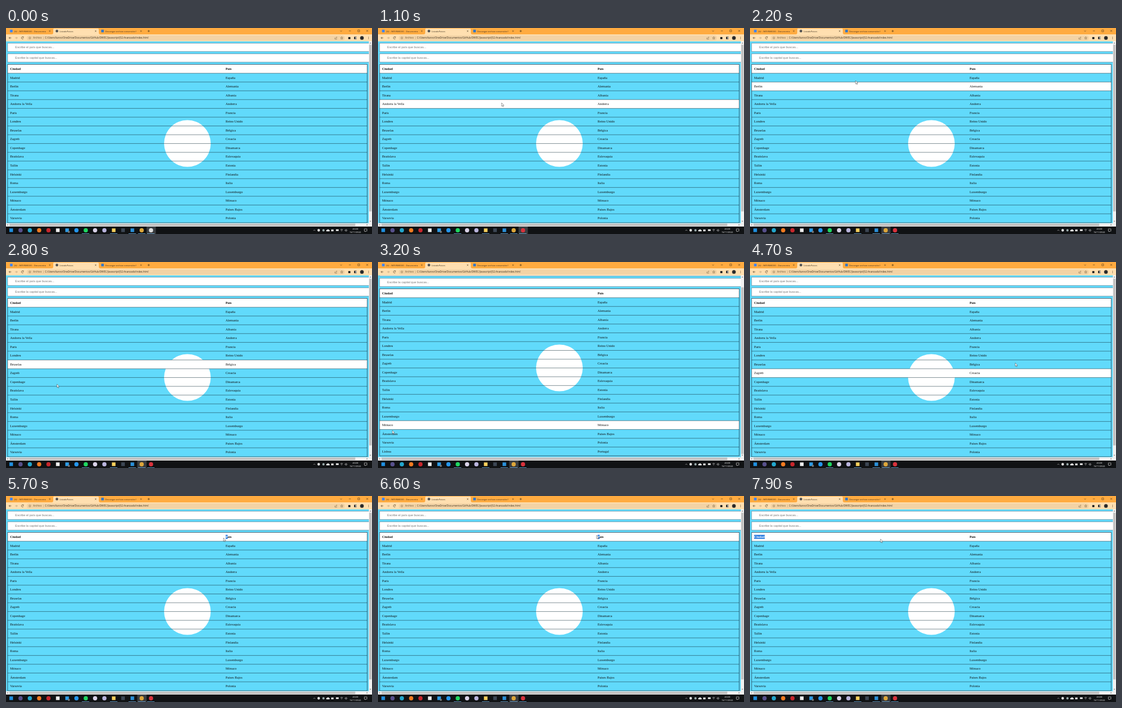
Write an HTML page that moves like this. It is 690 px wide and 388 px high and loops after 8000 ms.

```html
<!DOCTYPE html>
<html lang="es">
<head>
<meta charset="utf-8">
<title>ListadoPaises</title>
<style>
  html, body { margin: 0; width: 100%; height: 100%; overflow: hidden; background: #61dafb; }
  svg { display: block; width: 690px; height: 388px; }
  text { white-space: pre; }
  .ui { font-family: "Open Sans", "Noto Sans", sans-serif; fill: #3c3020; }
  .field { font: 5.75px "Liberation Sans", Arial, sans-serif; fill: #757575; }
  .cell { font: 6.3px "Liberation Serif", "Times New Roman", serif; fill: #111; }
  .head { font-weight: bold; }
</style>
</head>
<body>
<svg id="stage" viewBox="0 0 690 388" xmlns="http://www.w3.org/2000/svg">
  <defs><clipPath id="view"><rect y="25" width="684" height="342.6"/></clipPath></defs>
  <g clip-path="url(#view)"><g id="page"></g></g>
  <g id="chrome"></g>
  <g id="taskbar"></g>
  <path id="pointer" d="M0 0V6.4L1.5 5.1L2.5 7.3L3.5 6.9L2.5 4.7H4.5Z" fill="#fff" stroke="#333" stroke-width=".5"/>
</svg>
<script>
const LOOP = 8000, STEP = 100;
const TOP = 85.2, PITCH = 16.55, LEFT = 3, RIGHT = 681, COL = 414;

const countries = [
  ['Madrid', 'España'], ['Berlín', 'Alemania'], ['Tirana', 'Albania'],
  ['Andorra la Vella', 'Andorra'], ['París', 'Francia'], ['Londres', 'Reino Unido'],
  ['Bruselas', 'Bélgica'], ['Zagreb', 'Croacia'], ['Copenhage', 'Dinamarca'],
  ['Bratislava', 'Eslovaquia'], ['Tallin', 'Estonia'], ['Helsinki', 'Finlandia'],
  ['Roma', 'Italia'], ['Luxemburgo', 'Luxemburgo'], ['Mónaco', 'Mónaco'],
  ['Ámsterdam', 'Países Bajos'], ['Varsovia', 'Polonia'], ['Lisboa', 'Portugal']
];

// time, x, y
const pointerKeys = [
  [0, 273, 380], [400, 262, 330], [900, 236, 155], [1100, 233, 141], [1500, 222, 172],
  [2000, 205, 120], [2200, 199, 99], [2500, 150, 140], [3000, 60, 290], [3200, 27, 317],
  [3500, 110, 345], [4000, 400, 352], [4200, 444, 327], [4700, 500, 190], [5200, 440, 82],
  [5700, 410, 79], [6200, 410, 79], [6400, 411, 100], [6500, 412, 76], [6600, 412, 74],
  [6800, 412, 74], [7100, 15, 73], [7500, 17, 73], [7900, 246, 81]
];
// time, offset
const scrollKeys = [[2800, 0], [3100, 18], [4000, 18], [4100, 6], [4200, 1.2], [4300, 0]];

const byId = id => document.getElementById(id);
const page = byId('page'), chrome = byId('chrome'), taskbar = byId('taskbar');

function add(parent, tag, attrs, content) {
  const el = document.createElementNS('http://www.w3.org/2000/svg', tag);
  for (const k in attrs) el.setAttribute(k, attrs[k]);
  if (content) el.textContent = content;
  return parent.appendChild(el);
}
const rect = (g, x, y, width, height, fill, more) =>
  add(g, 'rect', { x, y, width, height, fill, ...more });
const dot = (g, cx, cy, r, fill) => add(g, 'circle', { cx, cy, r, fill });
const text = (g, x, y, cls, s, more) => add(g, 'text', { x, y, class: cls, ...more }, s);
const path = (g, d, stroke, width = .6, fill = 'none') =>
  add(g, 'path', { d, stroke, 'stroke-width': width, fill });
const ui = (x, y, size, s, more) => text(chrome, x, y, 'ui', s, { 'font-size': size, ...more });

// Page
rect(page, 0, 0, 690, 420, '#61dafb');
dot(page, 342, 217.5, 44, '#fff');
['Escribe el país que buscas...', 'Escribe la capital que buscas...'].forEach((hint, i) => {
  const y = 28.7 + i * 20;
  rect(page, LEFT, y, 690, 15.5, '#fff', { stroke: '#5b7f93', 'stroke-width': .7 });
  text(page, 17.3, y + 9.7, 'field', hint);
});
rect(page, LEFT, 68.5, RIGHT - LEFT, TOP - 68.5, '#fff');
const hoverRow = rect(page, LEFT, 0, RIGHT - LEFT, PITCH, '#fff');
const bottom = TOP + countries.length * PITCH;
path(page, `M${LEFT} 68.5H${RIGHT}V${bottom}H${LEFT}Z`, '#123', .7);
text(page, 7.7, 79.1, 'cell head', 'Ciudad');
text(page, COL, 79.1, 'cell head', 'País');
countries.forEach(([city, country], i) => {
  const y = TOP + i * PITCH;
  path(page, `M${LEFT} ${y}H${RIGHT}`, '#0b2733', .55);
  text(page, 7.7, y + 10.3, 'cell', city);
  text(page, COL, y + 10.3, 'cell', country);
});

function selection(x, width, label) {
  const g = add(page, 'g', {});
  rect(g, x, 73.2, width, 7.6, '#2b7de0');
  text(g, x, 79.1, 'cell head', label, { style: 'fill:#fff' });
  return g;
}
const pickedCity = selection(7.7, 20.2, 'Ciudad');
const pickedLetter = selection(COL, 3.9, 'P');

// Browser frame
rect(chrome, 0, 0, 690, 12, '#ffab40');
rect(chrome, 0, 12, 690, 13.2, '#ffdfb0');
path(chrome, 'M86 12Q89 12 89 9V3Q89 1 91 1H173Q175 1 175 3V9Q175 12 178 12Z', 'none', 0, '#ffdfb0');
rect(chrome, 7.5, 3.2, 5, 5, '#4285f4');
ui(15.5, 7.6, 4.1, 'JS2 - INTERMEDIO - Documento');
dot(chrome, 96, 5.8, 2.5, '#555');
ui(101, 7.6, 4.1, 'ListadoPaises');
rect(chrome, 179.5, 3.2, 5, 5, '#3478c8');
ui(187, 7.6, 4.1, 'Descargar archivo conversión f');
const cross = (x, y, r) => `M${x - r} ${y - r}l${2 * r} ${2 * r}m0 ${-2 * r}l${-2 * r} ${2 * r}`;
[82.5, 169, 254.5].forEach(x => path(chrome, cross(x, 5.8, 1.3), '#403018', .6));
path(chrome, 'M269 3.7v4.2M266.9 5.8h4.2', '#403018', .7);
path(chrome, 'M630 4.8l1.7 1.7 1.7-1.7M646.5 5.5h3.6M663.3 3.7h3.4v3.4h-3.4z' + cross(681, 5.4, 1.7), '#403018', .6);

path(chrome, 'M10 18.7H5.7m2-2l-2 2 2 2', '#4a3a22', .7);
path(chrome, 'M17 18.7h4.3m-2-2l2 2-2 2', '#b39a75', .7);
path(chrome, 'M32.7 17.3a2.1 2.1 0 1 0 .3 2.2m0-3.4v1.6h-1.6', '#4a3a22', .7);
rect(chrome, 39, 14, 600, 9.6, '#f3d3a5', { rx: 4.8 });
add(chrome, 'circle', { cx: 45, cy: 18.7, r: 1.8, fill: 'none', stroke: '#6a5535', 'stroke-width': .5 });
path(chrome, 'M45 18.4v1.2M45 17.6v.3', '#6a5535', .5);
ui(51, 20.4, 4.7, 'Archivo', { style: 'fill:#6a5535' });
path(chrome, 'M70.7 16.3v4.8', '#a88c62', .4);
ui(73.5, 20.4, 4.7, 'C:/Users/karvo/OneDrive/Documentos/GitHub/DWEC/Javascript/JS2-Avanzado/index.html');
path(chrome, 'M620 18v3h3.6v-1.2M621.5 19.5q.3-2 2.4-2m-1-1l1 1-1 1', '#5a4628', .5);
path(chrome, 'M633 16.4l.7 1.6 1.7.2-1.3 1.1.4 1.7-1.5-.9-1.5.9.4-1.7-1.3-1.1 1.7-.2z', '#5a4628', .5);
rect(chrome, 645.3, 17, 4, 4, '#222', { rx: .6 });
rect(chrome, 656.3, 16.5, 4.6, 4.6, '#222');
rect(chrome, 658.9, 17.1, 1.5, 3.4, '#fff');
dot(chrome, 671, 18.7, 3.5, '#2b2b2b');
[17, 18.7, 20.4].forEach(y => dot(chrome, 683.5, y, .5, '#403018'));

// Scrollbars
rect(chrome, 684, 25, 6, 349, '#f1f1f1');
rect(chrome, 0, 367.6, 690, 6.4, '#f1f1f1');
const thumb = rect(chrome, 684.7, 31.5, 4.6, 314, '#c1c1c1');
rect(chrome, 6.5, 368.4, 652, 4.7, '#c1c1c1');
path(chrome, 'M685.6 29l1.4-1.6 1.4 1.6zM685.6 363.5l1.4 1.6 1.4-1.6zM3.8 369.4l-1.6 1.4 1.6 1.4zM680 369.4l1.6 1.4-1.6 1.4z', 'none', 0, '#555');

// Taskbar
rect(taskbar, 0, 374, 690, 14, '#101214');
const activeSlot = rect(taskbar, 247.5, 374, 17.5, 14, '#3a3d40');
const icons = ['#1f8fe0', '#57508c', '#22a6cc', '#f47b20', '#c8262c', '#eee', '#2d9be5', '#2496ed',
  '#1ed760', '#d9d2e8', '#b9b4dd', '#f7cf5c', '#3c4654', '#2a8fd8', '#dda63a'];
icons.forEach((fill, i) => {
  const x = 9.8 + i * 17.57;
  if ([0, 5, 6, 11, 12, 13].includes(i)) rect(taskbar, x - 3.4, 377.5, 6.8, 6.8, fill);
  else dot(taskbar, x, 381, 4, fill);
});
dot(taskbar, 118.5, 384, 2, '#777');
const recorder = dot(taskbar, 273.4, 381, 4, '#ddd');
[150, 203, 238, 256, 273].forEach(x => rect(taskbar, x - 7, 387.2, 14, .8, '#76b9ed'));

path(taskbar, 'M579.4 382l1.8-1.8 1.8 1.8', '#ddd', .6);
dot(taskbar, 589.5, 381, 2.4, '#e8e8e8');
dot(taskbar, 598.5, 381, 2.2, '#9aa');
path(taskbar, 'M604.5 383h5a1.3 1.3 0 0 0-.4-2.5 2 2 0 0 0-3.6-.3 1.5 1.5 0 0 0-1 2.8z', 'none', 0, '#fff');
rect(taskbar, 613, 379.5, 4.6, 3.4, '#ddd');
rect(taskbar, 622, 379.3, 5.2, 3, '#eee');
path(taskbar, 'M630.5 380q2.3-2 4.6 0M631.5 381.3q1.3-1.1 2.6 0M632.3 382.6h1', '#eee', .6);
path(taskbar, 'M639 380.3h1l1.3-1.2v4l-1.3-1.2h-1zM642.5 379.6q1 1.5 0 3', '#eee', .5);
[['20:08', 379.6], ['16/11/2022', 385.8]].forEach(([s, y]) =>
  text(taskbar, 658.5, y, 'ui', s, { 'font-size': 4.1, 'text-anchor': 'middle', style: 'fill:#fff' }));
path(taskbar, 'M675.5 378.5h5v4h-2l-1.4 1.5v-1.5h-1.6z', '#eee', .6);

// Linear interpolation over [time, ...values] rows
function sample(keys, t) {
  const next = keys.findIndex(k => k[0] > t);
  if (next < 0) return keys.at(-1).slice(1);
  if (next === 0) return keys[0].slice(1);
  const a = keys[next - 1], b = keys[next], f = (t - a[0]) / (b[0] - a[0]);
  return a.slice(1).map((v, i) => v + (b[i + 1] - v) * f);
}
const show = (el, on) => el.setAttribute('visibility', on ? 'visible' : 'hidden');

function draw(t) {
  const [x, y] = sample(pointerKeys, t), [offset] = sample(scrollKeys, t);
  byId('pointer').setAttribute('transform', `translate(${x} ${y})`);
  show(byId('pointer'), t >= 300);
  page.setAttribute('transform', `translate(0 ${-offset})`);
  thumb.setAttribute('y', 31.5 + offset * .9);

  // The highlight trails the pointer by one step
  const past = Math.max(0, t - STEP), pastY = sample(pointerKeys, past)[1];
  const row = Math.floor((pastY + sample(scrollKeys, past)[0] - TOP) / PITCH);
  show(hoverRow, pastY < 367 && row >= 0 && row < countries.length);
  hoverRow.setAttribute('y', TOP + row * PITCH);

  show(pickedLetter, t >= 5600 && t < 7100);
  show(pickedCity, t >= 7300);
  activeSlot.setAttribute('x', t < 1500 ? 265 : 247.5);
  recorder.setAttribute('fill', t < 500 ? '#ddd' : '#d8323c');
}

let start;
function tick(now) {
  start ??= now;
  draw(Math.floor((now - start) % LOOP / STEP) * STEP);
  requestAnimationFrame(tick);
}
draw(0);
requestAnimationFrame(tick);
</script>
</body>
</html>
```
